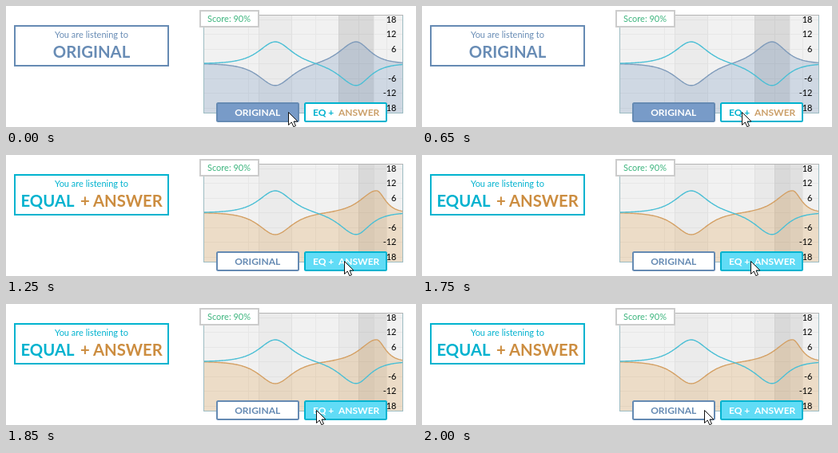
Write an HTML page that moves like this. It is 513 by 152 pixels and loops after 2.5 s.

```html
<!DOCTYPE html>
<html lang="en">
<head>
<meta charset="utf-8">
<title>EQ quiz</title>
<style>
  html, body { margin: 0; width: 100%; height: 100%; overflow: hidden; background: #fff; }
  svg { display: block; font: 11px Lato, sans-serif; }
  .mid { text-anchor: middle; }
  .end { text-anchor: end; }
  .title { font-size: 20.3px; font-weight: 700; }
  .button { font-size: 12px; font-weight: 700; }
  .line { fill: none; stroke-width: 1.4; }
  .box { stroke-width: 2; }
</style>
</head>
<body>
<svg width="513" height="152" viewBox="0 0 513 152">
  <rect x="247.5" y="11.5" width="249" height="123" fill="#f1f1f1"/>
  <path d="M316 12h42v122h-42z" fill="#020" opacity=".022"/>
  <path id="grid" stroke="#000" opacity=".035"/>
  <path id="bandOriginal" d="M416 12h44v122h-44z" opacity=".1"/>
  <g id="bandAnswer">
    <path d="M416 12h44v122h-44z" opacity=".03"/>
    <path d="M441 12h35v122h-35z" opacity=".07"/>
  </g>
  <path id="fill" opacity=".25"/>
  <path id="curve" class="line"/>
  <path id="eq" class="line" stroke="#4bbfd5"/>
  <rect x="247.5" y="11.5" width="249" height="123" fill="none" stroke="#9dbcc2"/>
  <path d="M247 11.5H497" stroke="#b4b4b4"/>
  <g id="labels" class="end" fill="#000"></g>

  <rect class="box" x="243" y="6" width="73" height="20" fill="#fff" stroke="#ccc"/>
  <text class="mid" x="279" y="20" fill="#3db57e">Score: 90%</text>

  <rect id="panel" class="box" x="11" y="25" width="192" height="50" fill="#fff"/>
  <text id="caption" class="mid" x="107" y="40">You are listening to</text>
  <text id="titleOriginal" class="title mid" x="107" y="65" fill="#688cb5">ORIGINAL</text>
  <g id="titleAnswer" class="title">
    <text x="18.5" y="65" fill="#00b2cf">EQUAL</text>
    <text x="93" y="65" fill="#cc8d40">+</text>
    <text x="109" y="65" fill="#cc8d40">ANSWER</text>
  </g>

  <g class="button">
    <rect id="left" class="box" x="264" y="122" width="102" height="23" rx="1.5" stroke="#658ab3"/>
    <text id="leftText" class="mid" x="314.7" y="138">ORIGINAL</text>
    <rect id="right" class="box" x="374" y="122" width="102" height="23" rx="1.5" stroke="#00b3cf"/>
    <text id="eqText" x="384" y="138">EQ +</text>
    <text id="answerText" x="416" y="138">ANSWER</text>
  </g>
  <path id="cursor" d="M0 .5V16.5L3.8 13L6.3 18.7L9 17.5L6.5 12H11.5Z"
        fill="#fff" stroke="#111" stroke-linejoin="round"/>
</svg>
<script>
const $ = id => document.getElementById(id);
const set = (id, attrs) => {
  for (const name in attrs) $(id).setAttribute(name, attrs[name]);
};
const ZERO = 72.4, GAIN = 27.6;

// Bell with separate widths on its two sides
const bell = (x, centre, left, right) =>
  GAIN / Math.cosh((x - centre) / (x < centre ? left : right));

function curvePath(sign, centre, left, right) {
  let d = "";
  for (let x = 248; x <= 496; x++) {
    const y = ZERO + sign * (bell(x, 337, 18, 18) - bell(x, centre, left, right));
    d += (d ? "L" : "M") + x + " " + y.toFixed(2);
  }
  return d;
}

const eqCurve = curvePath(-1, 438, 18, 15);
const originalCurve = curvePath(1, 438, 18, 15);
const answerCurve = curvePath(1, 463.5, 17.5, 9.5);
set("eq", { d: eqCurve });

let grid = [303, 316, 357, 387, 416, 441, 460, 476].map(x => `M${x}.5 12V134`).join("");
for (let db = -18; db <= 18; db += 6) {
  const y = 72.5 - db * 18.5 / 6;
  grid += `M248 ${Math.floor(y) + .5}H496`;
  if (db) $("labels").innerHTML += `<text x="488.5" y="${y + 3.5}">${db}</text>`;
}
set("grid", { d: grid });

function showMode(answer) {
  const colour = answer ? "#d4a064" : "#7f9bbb";
  const path = answer ? answerCurve : originalCurve;
  set("curve", { d: path, stroke: colour });
  set("fill", { d: path + "V134H248Z", fill: answer ? "#dc9a48" : "#688cb9" });
  set("panel", { stroke: answer ? "#00b3cf" : "#658ab3" });
  set("caption", { fill: answer ? "#00b2cf" : "#688cb5" });
  set("left", { fill: answer ? "#fff" : "#789bc8" });
  set("leftText", { fill: answer ? "#658ab3" : "#fff" });
  set("right", { fill: answer ? "#61dcf6" : "#fff" });
  set("eqText", { fill: answer ? "#fff" : "#00b2cf" });
  set("answerText", { fill: answer ? "#fff" : "#cba06a" });
  for (const part of ["title", "band"]) {
    set(part + "Original", { display: answer ? "none" : "inline" });
    set(part + "Answer", { display: answer ? "inline" : "none" });
  }
}

// Six pointer steps of 50 ms, the first one at the start time
const steps = (t, start) =>
  Math.max(0, Math.min(6, Math.floor((t - start) / 50) + 1));

let mode;
function draw() {
  const t = performance.now() % 2500;
  const answer = t >= 1250;
  if (answer !== mode) showMode(mode = answer);
  const x = 353.5 + Math.round((steps(t, 500) - steps(t, 1750)) * 70 / 6);
  set("cursor", { transform: `translate(${x} 133)` });
  requestAnimationFrame(draw);
}
draw();
</script>
</body>
</html>
```
